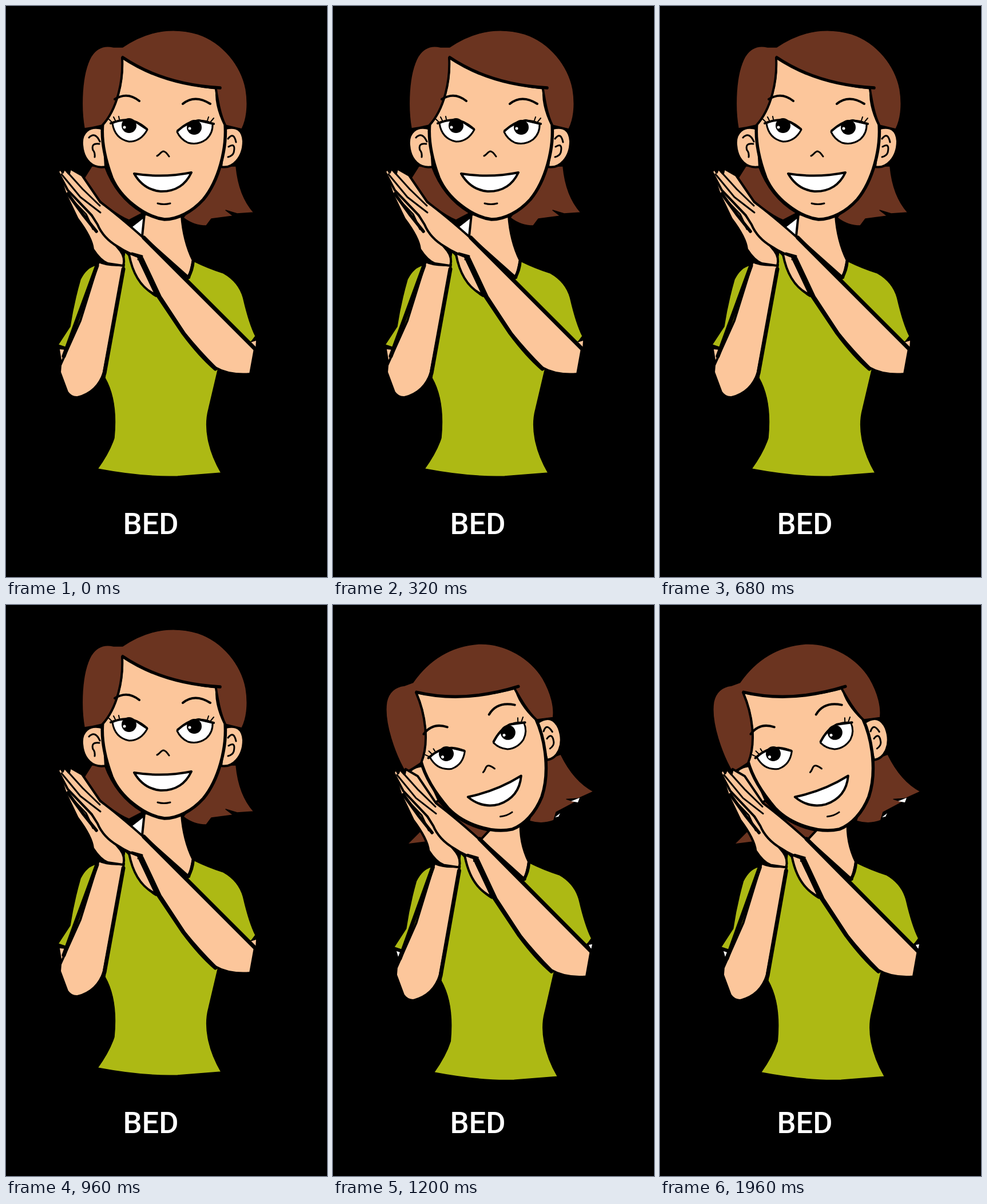
Animation, 561 px wide and 998 px high, one loop 2000 ms. Source, as an HTML page:

```html
<!DOCTYPE html>
<html lang="en">
<head>
<meta charset="utf-8">
<title>Sign for bed</title>
<style>
  html, body { margin: 0; width: 100%; height: 100%; overflow: hidden; background: #000; }
  svg { display: block; width: 100vw; height: 100vh; }
  path, circle { stroke: #000; stroke-width: 4; stroke-linejoin: round; stroke-linecap: round; }
  .skin { fill: #fcc69b; }
  .hair { fill: #6b3420; stroke-width: 1.5; }
  .shirt { fill: #adb914; stroke-width: 1.5; }
  .white { fill: #fff; }
  .line { fill: none; }
  .fine { stroke-width: 2; }
  .thin { stroke-width: 3; }
  .bold { stroke-width: 5.5; }
  .thick { stroke-width: 7; }
  .flat { stroke: none; }
  text { font: 500 52.5px Roboto, Arial, sans-serif; fill: #fff; text-anchor: middle; }
</style>
</head>
<body>
<svg viewBox="0 0 561 998">
  <rect width="561" height="998"/>

  <g class="head">
    <path class="hair" d="M376 280H402C405 312 414 340 433 361L404 363 384 357 397 367 359 372 350 384Q328 384 310 370Z"/>
    <path class="hair" d="M131 310L150 280H172Q192 335 238 362L215 374Q185 362 131 310Z"/>
  </g>
  <path class="hair asleep" d="M130 418L154 394 162 414Z"/>
  <g class="asleep white">
    <path class="flat" d="M416 343L431 337 428 345Z"/>
    <path class="flat" d="M388 371L397 364 394 370Z"/>
    <path class="flat" d="M111 605L117 607 114 615Z"/>
    <path class="flat" d="M447 594L453 593 451 602Z"/>
  </g>

  <g class="body">
    <path class="shirt" d="M158 453Q141 456 130 478Q118 520 112 560L91 592 106 597 130 560Z"/>
    <path class="shirt" d="M208 430L173 650C190 680 193 715 189 755Q181 780 160 809Q240 824 300 822L376 816C352 775 346 735 354 705L370 637 430 585 436 577Q425 555 415 512Q408 483 380 467Q352 458 328 446L320 470 262 508Q230 490 214 436Z"/>
    <path class="skin flat awake" d="M94 600L104 601 98 625Z M427 588L437 585 436 600Z"/>
    <path class="white thin awake" d="M216 388L243 367 238 408Z"/>
    <path class="skin awake" d="M242 364L238 402 320 475 327 445Q310 410 307 366Z"/>
    <path class="skin asleep" d="M260 388L243 406 320 475 327 445Q310 410 313 372Z"/>
    <path class="line bold" d="M327 446Q326 462 318 475"/>
    <path class="skin" d="M215 434Q223 430 230 437L262 505Q225 488 215 434Z"/>
  </g>

  <g class="head">
    <path class="skin" d="M170 215C145 207 131 222 133 243C135 270 152 285 174 281Z"/>
    <path class="line thin awake" d="M145 230Q156 219 164 237M163 241Q148 239 152 252Q156 256 155 264"/>
    <path class="skin" d="M384 214Q413 207 415 236C415 265 396 285 376 281Z"/>
    <path class="line thin" d="M388 232Q398 219 402 238M389 246Q402 238 398 256Q396 262 388 264"/>
    <path class="skin bold" d="M200 87C240 115 300 135 370 143C366 160 372 185 383 207C386 250 372 305 345 338C325 360 300 373 277 373C240 368 200 335 185 300C172 265 166 235 169 205C195 175 200 130 200 87Z"/>
    <path class="hair" d="M137 214C131 180 131 120 149 88Q163 66 188 72L204 72C245 44 290 36 335 49C380 64 411 105 419 145C424 175 420 200 412 215L383 208C374 190 370 165 367 145C310 140 250 120 204 90C206 130 196 180 168 208Q152 212 137 214Z"/>
    <path class="line" d="M203 91C205 130 195 180 168 209M367 146C370 165 374 190 383 208"/>
    <path class="line bold" d="M204 90C250 121 305 139 374 143"/>

    <path class="line" d="M190 163Q212 149 233 166M309 171Q330 154 357 171"/>
    <path class="white thin" d="M186 205Q205 195 225 202Q238 206 247 216Q236 237 215 237Q190 232 186 205Z"/>
    <path class="white thin" d="M299 220Q315 202 335 200Q352 200 361 206Q362 222 350 233Q335 244 318 239Q305 233 299 220Z"/>
    <circle class="flat" cx="215" cy="209" r="13"/>
    <circle class="flat" cx="329" cy="212" r="13"/>
    <circle class="white flat" cx="207" cy="212" r="2.5"/>
    <circle class="white flat" cx="321" cy="214" r="2.5"/>
    <path class="line" d="M183 205Q208 195 228 203L246 215M300 218Q318 202 337 200L363 206"/>
    <path class="line fine" d="M185 203L180 198M191 200L188 194M198 198L197 193M352 200L354 194M358 202L363 196"/>
    <path class="line thin" d="M264 262C269 260 271 254 275 254Q279 254 285 263"/>
    <path class="white" d="M224 293Q274 301 324 291Q308 325 270 324Q240 321 224 293Z"/>
    <path class="line thin" d="M265 345Q276 348 287 345"/>
  </g>

  <g class="body">
    <path class="skin" d="M162 447Q180 455 206 452L204 465 171 640Q160 675 125 684Q114 685 107 675L94 640 95 628 130 550Z"/>
    <path class="line thick" d="M205 460L172 642M159 454L101 612"/>
    <path class="skin" d="M91 288L104 328 125 372Q150 405 152 425Q165 445 178 450L205 454Q209 440 200 428L160 380 110 310Z"/>
    <path class="skin" d="M112 284L133 296Q148 318 165 343Q195 365 240 405L435 599 427 643Q390 646 366 632Q337 603 312 572L270 508 238 440Q215 434 196 421Q170 406 160 382L150 366 108 322 91 290 95 284 99 291 102 284 110 293Z"/>
    <path class="line thick" d="M241 405L435 599M236 446L265 505 310 572Q340 612 366 634"/>
    <path class="line bold" d="M108 328L134 364 158 394"/>
    <path class="line thin" d="M97 294L130 334 165 361M106 289L134 320 164 349M117 340L140 364 152 390M220 432L238 437 231 443"/>
  </g>

  <text x="253" y="923">BED</text>
</svg>
<script>
  const LOOP = 2000, TILT_AT = 1000;
  const poses = {
    awake: { head: "", body: "" },
    asleep: {
      head: "translate(254 247) rotate(-20.5) translate(-272 -216.5)",
      body: "matrix(1 0 .003 1.01 14 0)"
    }
  };
  const all = name => document.querySelectorAll("." + name);

  function draw(time) {
    const current = time % LOOP < TILT_AT ? "awake" : "asleep";
    for (const part of ["head", "body"])
      all(part).forEach(el => el.setAttribute("transform", poses[current][part]));
    for (const name in poses)
      all(name).forEach(el => el.style.display = name === current ? "" : "none");
  }

  const start = performance.now();
  function tick() {
    draw(performance.now() - start);
    requestAnimationFrame(tick);
  }
  tick();
</script>
</body>
</html>
```
